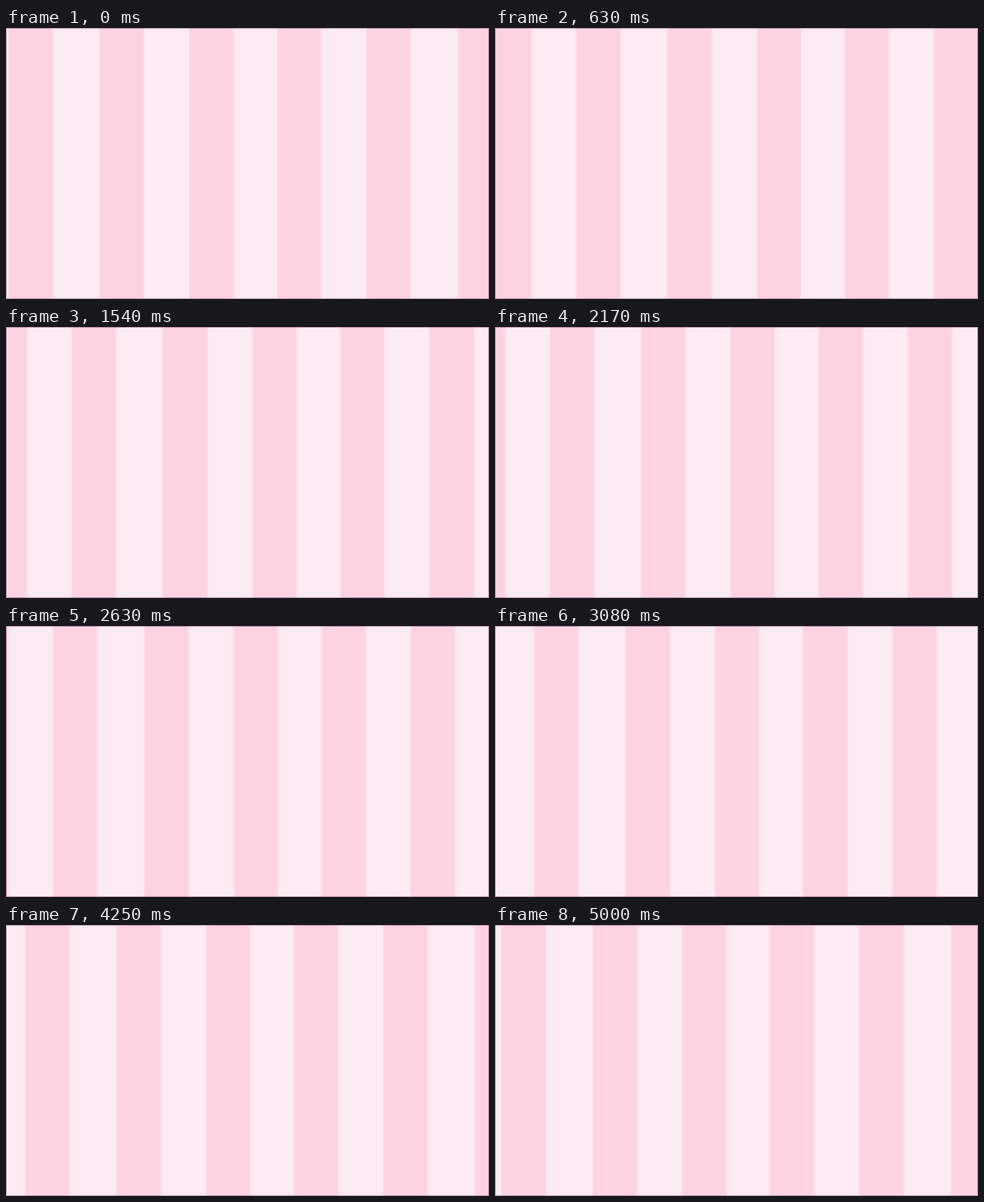
An HTML page with a canvas for the animation above (5040 ms loop, 640 px wide and 360 px high).

```html
<!DOCTYPE html>
<html lang="en">
<head>
<meta charset="utf-8">
<title>Drifting stripes</title>
<style>
  html, body { margin: 0; width: 100%; height: 100%; overflow: hidden; }
  canvas { display: block; width: 100vw; height: 100vh; }
</style>
</head>
<body>
<canvas id="stage" width="640" height="360"></canvas>
<script>
const ctx = document.getElementById('stage').getContext('2d');
const W = 640, H = 360;
const LOOP = 5040;        // ms
const SPEED = 0.02265;    // px per ms, leftwards
const WRAP = 560;         // ms at which the pattern steps back by one stripe
const STEP = 118.6;       // px of that step
const PINK = '#fdd3e2', PALE = '#fdebf4', FRAME = 'rgba(90, 50, 70, .42)';

// Hand-drawn stripes: slightly uneven left and right edges
const stripes = [
  [4, 63.1], [121.8, 180.6], [242.6, 301.6], [361.3, 420],
  [477.9, 536.5], [596.1, 654.9], [717.8, 776.6]
];

function band(left, right, alpha) {
  ctx.globalAlpha = alpha;
  ctx.fillRect(left, 0, right - left, H);
}

function draw(now) {
  const t = now % LOOP;
  const shift = SPEED * t + (t < WRAP ? STEP : 0);

  ctx.globalAlpha = 1;
  ctx.fillStyle = PALE;
  ctx.fillRect(0, 0, W, H);

  ctx.fillStyle = PINK;
  for (const [left, right] of stripes) {
    band(left - shift - 0.7, right - shift + 0.7, 0.5);   // soft edge
    band(left - shift + 0.7, right - shift - 0.7, 1);
  }

  ctx.globalAlpha = 1;
  ctx.strokeStyle = FRAME;
  ctx.strokeRect(0.5, 0.5, W - 1, H - 1);
}

const start = performance.now();
function tick() {
  draw(performance.now() - start);
  requestAnimationFrame(tick);
}
tick();
</script>
</body>
</html>
```
